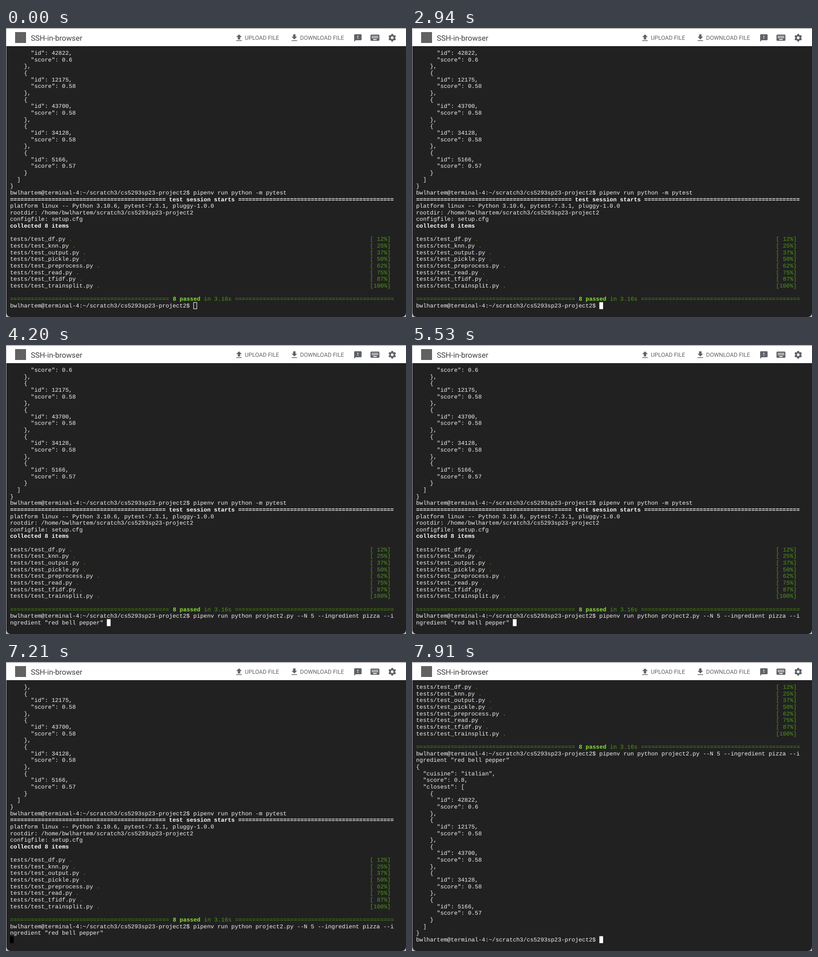
An HTML page with a canvas that plays this animation: 879 px wide and 637 px high, repeating every 8000 ms.

```html
<!DOCTYPE html>
<html lang="en">
<head>
<meta charset="utf-8">
<title>Terminal</title>
<style>
  html, body { margin: 0; width: 100%; height: 100%; overflow: hidden; background: #b8b8b8; }
  canvas { display: block; width: 879px; height: 637px; }
</style>
</head>
<body>
<canvas id="stage" width="879" height="637"></canvas>
<script>
const ctx = document.getElementById('stage').getContext('2d');
const LOOP = 8000;
const COLS = 111, ROWS = 39;
const CELL = 7.604, PITCH = 14.655, LEFT = 9, BASE = 59.1;
const MONO = '12.673px "Liberation Mono", "Courier New", monospace';
const UI = 'Roboto, sans-serif';
const GREY = '#5f6368';

const STYLES = {
  plain: ['#f1f1f1', ''],
  bold: ['#ffffff', 'bold '],
  green: ['#4b9a13', ''],
  lime: ['#87e032', 'bold ']
};

// A line is a list of runs: [column, text, style].
const line = (text, style = 'plain') => [[0, text, style]];

const PROMPT = 'bwlhartem@terminal-4:~/scratch3/cs5293sp23-project2$ ';
const TEST_CMD = 'pipenv run python -m pytest';
const QUERY_CMD = 'pipenv run python project2.py --N 5 --ingredient pizza --ingredient "red bell pepper" ';

const result = JSON.stringify({
  cuisine: 'italian',
  score: 0.8,
  closest: [[42822, 0.6], [12175, 0.58], [43700, 0.58], [34128, 0.58], [5166, 0.57]]
    .map(([id, score]) => ({ id, score }))
}, null, 2).split('\n').map(s => line(s));

const tests = ['df', 'knn', 'output', 'pickle', 'preprocess', 'read', 'tfidf', 'trainsplit']
  .map((name, i, all) => {
    const file = `tests/test_${name}.py `;
    const done = String(Math.floor((i + 1) * 100 / all.length)).padStart(3);
    return [[0, file, 'plain'], [file.length, '.', 'green'], [104, `[${done}%]`, 'green']];
  });

const rule = n => '='.repeat(n);

const session = [
  line(PROMPT + TEST_CMD),
  line(`${rule(45)} test session starts ${rule(45)}`, 'bold'),
  line('platform linux -- Python 3.10.6, pytest-7.3.1, pluggy-1.0.0'),
  line('rootdir: /home/bwlhartem/scratch3/cs5293sp23-project2'),
  line('configfile: setup.cfg'),
  line('collected 8 items', 'bold'),
  line(''),
  ...tests,
  line(''),
  [[0, rule(46), 'green'], [47, '8 passed', 'lime'], [56, 'in 3.16s ' + rule(46), 'green']]
];

const history = [...result, ...session];

function wrap(text) {
  const out = [];
  for (let i = 0; i < text.length; i += COLS) out.push(line(text.slice(i, i + COLS)));
  return out;
}

const query = wrap(PROMPT + QUERY_CMD);

const screens = [
  [0, [...history, line(PROMPT)]],
  [3430, [...history, line(PROMPT + TEST_CMD)]],
  [4200, [...history, ...query]],
  [5600, [...history, ...query, line('')]],
  [7840, [...history, ...query, ...result, line(PROMPT)]]
];

// Cursor changes: [time, look]
const cursor = [
  [0, 'hollow'], [2940, 'on'], [3990, 'off'], [4200, 'on'], [4760, 'off'],
  [5250, 'on'], [6160, 'off'], [6650, 'on'], [7210, 'off'], [7700, 'on']
];

const at = (track, t) => track.filter(([start]) => start <= t).pop()[1];

function label(text, x, y, size, color) {
  ctx.font = `${size}px ${UI}`;
  ctx.fillStyle = color;
  ctx.fillText(text, x, y);
}

function icon(path, x, y, scale, draw) {
  ctx.save();
  ctx.translate(x, y);
  ctx.scale(scale, scale);
  ctx.fillStyle = GREY;
  ctx.fill(new Path2D(path));
  if (draw) {
    ctx.fillStyle = '#fff';
    draw();
  }
  ctx.restore();
}

function gear(x, y) {
  ctx.save();
  ctx.translate(x, y);
  ctx.fillStyle = GREY;
  ctx.beginPath();
  ctx.arc(0, 0, 6.4, 0, Math.PI * 2);
  ctx.fill();
  for (let i = 0; i < 6; i++) {
    ctx.rotate(Math.PI / 3);
    ctx.beginPath();
    ctx.moveTo(-2.8, -5);
    ctx.lineTo(-1.7, -8.4);
    ctx.lineTo(1.7, -8.4);
    ctx.lineTo(2.8, -5);
    ctx.fill();
  }
  ctx.fillStyle = '#fff';
  ctx.beginPath();
  ctx.arc(0, 0, 2.9, 0, Math.PI * 2);
  ctx.fill();
  ctx.restore();
}

function header() {
  ctx.fillStyle = '#fff';
  ctx.fillRect(1, 1.5, 878, 38.5);
  ctx.fillStyle = '#616161';
  ctx.fillRect(20, 9, 24, 24);
  label('SSH-in-browser', 54.5, 28, 16.5, '#3c4043');
  label('UPLOAD FILE', 524.8, 25.5, 12.7, GREY);
  label('DOWNLOAD FILE', 646.3, 25.5, 12.7, GREY);
  icon('M5 20h14v-2H5zM5 10h4v6h6v-6h4l-7-7z', 501.7, 11.4, 0.86);
  icon('M5 20h14v-2H5zM19 9h-4V3H9v6H5l7 7z', 623.3, 11.4, 0.86);
  icon('M20 2H4Q2 2 2 4V22l4-4h14q2 0 2-2V4q0-2-2-2z', 763.4, 12.2, 0.82, () => {
    ctx.fillRect(11, 6, 2, 4);
    ctx.fillRect(11, 12, 2, 2);
  });
  icon('M20 5H4Q2 5 2 7V17q0 2 2 2h16q2 0 2-2V7q0-2-2-2z', 799, 9.6, 0.98, () => {
    for (let i = 0; i < 5; i++) {
      ctx.fillRect(5 + i * 3, 8, 2, 2);
      ctx.fillRect(5 + i * 3, 11, 2, 2);
    }
    ctx.fillRect(8, 15, 8, 2);
  });
  gear(848.7, 21.5);
}

function drawCursor(col, look) {
  const x = LEFT + col * CELL - 0.3, y = 604.4;
  if (look === 'hollow') {
    ctx.strokeStyle = '#f1f1f1';
    ctx.lineWidth = 1.2;
    ctx.strokeRect(x + 0.6, y + 0.6, 7, 14);
  } else {
    ctx.fillStyle = look === 'on' ? '#fff' : '#000';
    ctx.fillRect(x, y, 8.2, 15.2);
  }
}

function terminal(t) {
  const lines = at(screens, t).slice(-ROWS);
  lines.forEach((runs, row) => {
    for (const [col, text, style] of runs) {
      const [color, weight] = STYLES[style];
      ctx.font = weight + MONO;
      ctx.fillStyle = color;
      ctx.fillText(text, LEFT + col * CELL, Math.round(BASE + row * PITCH));
    }
  });
  drawCursor(lines[ROWS - 1][0][1].length, at(cursor, t));
}

function render(t) {
  ctx.fillStyle = '#b8b8b8';
  ctx.fillRect(0, 0, 879, 637);
  ctx.fillStyle = '#212121';
  ctx.beginPath();
  ctx.roundRect(1, 1.5, 878, 635.5, [0, 0, 9, 9]);
  ctx.fill();
  header();
  terminal(t);
}

ctx.textRendering = 'geometricPrecision';
const start = performance.now();
function tick() {
  render((performance.now() - start) % LOOP);
  requestAnimationFrame(tick);
}
tick();
</script>
</body>
</html>
```
